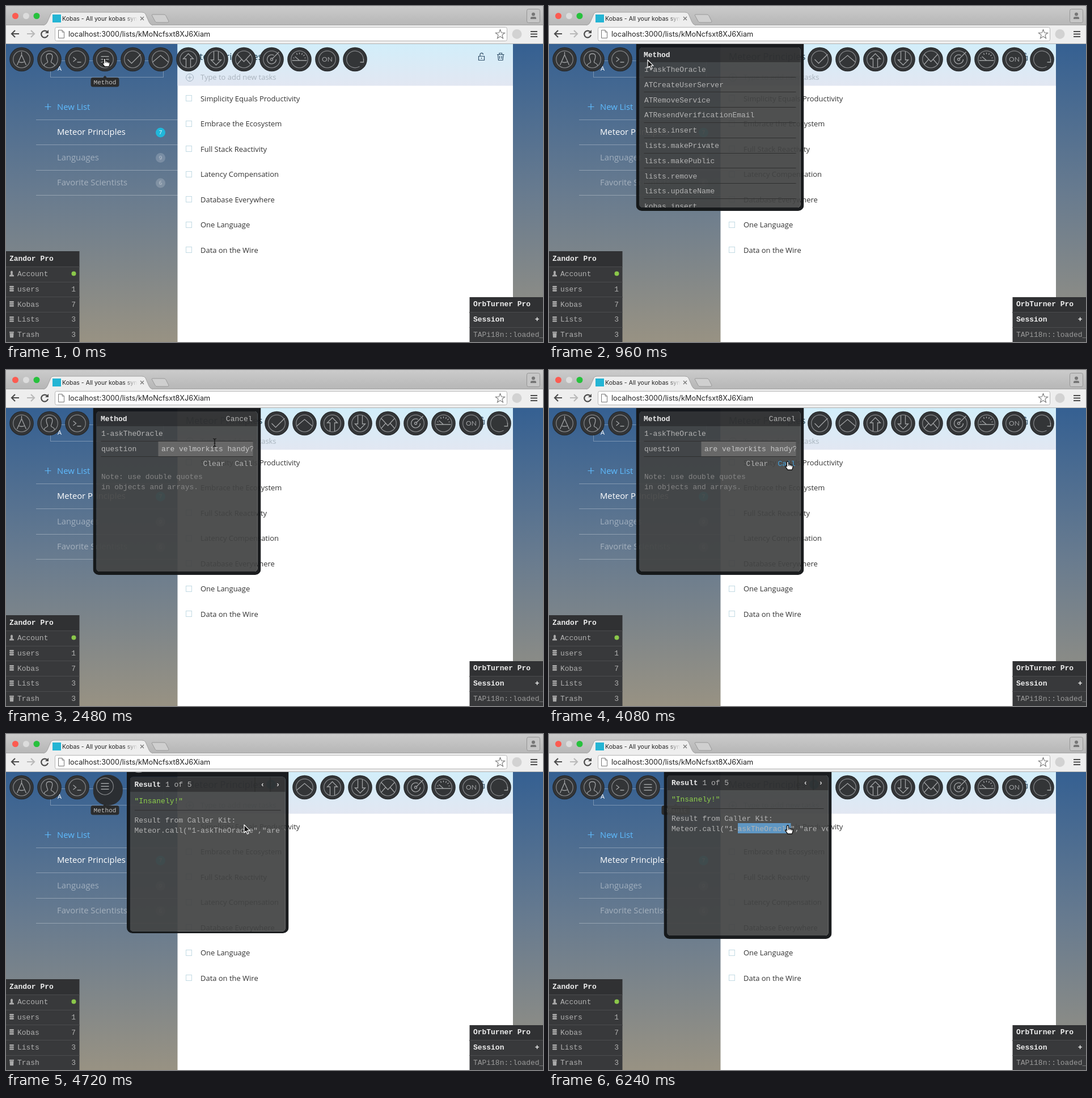
An HTML page with a canvas for the animation above (6320 ms loop, 947 by 592 pixels).

```html
<!DOCTYPE html>
<html lang="en">
<head>
<meta charset="utf-8">
<title>Method panel demo</title>
<style>
html, body { margin: 0; width: 100%; height: 100%; overflow: hidden; background: #fff }
canvas { display: block }
</style>
</head>
<body>
<canvas id="stage" width="947" height="592"></canvas>
<script>
const g = document.getElementById('stage').getContext('2d');
const LOOP = 6320, STEP = 80, TAU = Math.PI * 2;
const OPEN = 325, FORM = 1280, TYPE = 1760, CALL = 4285, HOVER = 5600, SELECT = 5900;
const QUESTION = 'are velmorkits handy?';
const METHODS = ['1-askTheOracle', 'ATCreateUserServer', 'ATRemoveService', 'ATResendVerificationEmail',
  'lists.insert', 'lists.makePrivate', 'lists.makePublic', 'lists.remove', 'lists.updateName', 'kobas.insert'];
const TASKS = ['Simplicity Equals Productivity', 'Embrace the Ecosystem', 'Full Stack Reactivity',
  'Latency Compensation', 'Database Everywhere', 'One Language', 'Data on the Wire'];
const ICONS = [
  'M0-13V-8L-8 10M0-8L8 10M-6 4Q0 7 6 4',
  'M-9 11Q-9 8-4 6Q-2 5-4 1Q-8-10 0-10Q8-10 4 1Q2 5 4 6Q9 8 9 11',
  'M-7-4L-2 0L-7 4M0 5H7',
  'M-7-5H7M-7 0H7M-7 5H7',
  'M-9 0L-2 7L14-9',
  'M-14 5L0-7L14 5',
  'M-4 14V-1H-9L0-10L9-1H4V14',
  'M-4-14V1H-9L0 10L9 1H4V-14',
  'M-12-9L0 4L12-9M-12 9L-4 0M12 9L4 0',
  'M8 0A8 8 0 1 1 4-7M2 0A2 2 0 1 1-2 0A2 2 0 1 1 2 0M1-1L13-13',
  'M-13 2H13M0 2L-8-5M-11-3L-9-2M-5-11L-4-8M0-12V-9M5-11L4-8M9-8L7-6M11-3L9-2',
  '',
  'M15-1V5H9'
].map(d => new Path2D(d));
const ARROW = new Path2D('M0 0V14L3.3 11L5.6 16.2L8 15.2L5.7 10.2H10Z');
const HAND = new Path2D('M-1.5 1Q0-1 1.5 1V5Q3 4 4 6Q6 5 6.5 7Q9 6 9 8.5V11L7.5 15H0L-4.5 9Q-4.5 7-1.5 9Z');
const IBEAM = new Path2D('M-3-7Q0-7 0-5Q0-7 3-7M0-5V5M-3 7Q0 7 0 5Q0 7 3 7M-1.5 1H1.5');

// time, x, y of the pointer tip
const POINTER = [[0, 174, 92], [320, 174, 92], [560, 173, 90], [960, 174, 95], [1180, 190, 107],
  [1320, 190, 107], [1680, 368, 128], [2720, 368, 128], [3520, 421, 161], [4290, 421, 161],
  [4400, 420, 160], [5500, 420, 160], [5600, 421, 161]];

const clamp = v => Math.max(0, Math.min(1, v));
const swing = v => .5 - Math.cos(Math.PI * clamp(v)) / 2;
const mix = (a, b, k) => a + (b - a) * k;

function rect(x, y, w, h, color) { g.fillStyle = color; g.fillRect(x, y, w, h); }
function box(x, y, w, h, r, fill, line) {
  g.beginPath(); g.roundRect(x, y, w, h, r); g.fillStyle = fill; g.fill();
  if (line) { g.strokeStyle = line; g.lineWidth = 1; g.stroke(); }
}
function frame(x, y, w, h, color) { g.lineWidth = 1; g.strokeStyle = color; g.strokeRect(x + .5, y + .5, w, h); }
function disc(x, y, r, color) { g.beginPath(); g.arc(x, y, r, 0, TAU); g.fillStyle = color; g.fill(); }
function shape(d, color, fill, width = 1) {
  const p = d instanceof Path2D ? d : new Path2D(d);
  if (fill) { g.fillStyle = fill; g.fill(p); }
  if (color) { g.strokeStyle = color; g.lineWidth = width; g.stroke(p); }
}
function shade(y0, y1, ...colors) {
  const s = g.createLinearGradient(0, y0, 0, y1);
  colors.forEach((c, i) => s.addColorStop(i / (colors.length - 1), c));
  return s;
}
// y is the middle of the capital letters
function label(s, x, y, size, color, family, align = 'left', weight = 400) {
  g.font = `${weight} ${size}px ${family}`;
  g.textAlign = align;
  g.fillStyle = color;
  g.fillText(s, x, Math.round(y + size * .34));
}
const sans = (s, x, y, size, color, align) => label(s, x, y, size, color, '"Open Sans", sans-serif', align);
const ui = (s, x, y, size, color) => label(s, x, y, size, color, 'Inter, sans-serif');
const mono = (s, x, y, color, align, weight, size = 12.96) =>
  label(s, x, y, size, color, '"Liberation Mono", monospace', align, weight);

function chrome() {
  const bar = '#eeeeee';
  rect(0, 0, 947, 34, shade(0, 34, '#cbcbcb', '#b6b6b6'));
  [['#fc5b51', 16.5], ['#dcdcdc', 35.5], ['#27c13d', 54]].forEach(([c, x]) => disc(x, 17.5, 5.5, c));
  shape('M257 16Q257 15 259 15H278Q281 15 282 17L287 27Q287 29 285 29H267Q264 29 263 27Z', '#999', '#cfcfcf');
  rect(0, 33, 947, 34, bar);
  rect(0, 33, 947, 1, '#a2a2a2');
  shape('M66 34Q71 33 73 28L79 14Q80 11 84 11H240Q244 11 246 14L252 28Q254 33 259 34', '#a2a2a2', bar);
  rect(82, 15, 15, 14, '#24b5d4');
  ui('Kobas - All your kobas sync', 99, 22, 10.5, '#222');
  const fade = g.createLinearGradient(208, 0, 232, 0);
  fade.addColorStop(0, bar + '00');
  fade.addColorStop(1, bar);
  rect(208, 14, 24, 17, fade);
  rect(231, 14, 12, 17, bar);
  shape('M237 19L243 25M243 19L237 25', '#777', null, 1.3);
  box(918.5, 5.5, 23, 24, 3, '#c6c6c6', '#959595');
  disc(930, 14.5, 3, '#777');
  shape('M925 23V21Q925 19 928 19H932Q935 19 935 21V23Z', null, '#777');

  shape('M23 49H10M16 43L10 49L16 55', '#4c4c4c', null, 2.2);
  shape('M37 49H50M44 43L50 49L44 55', '#b9b9b9', null, 2.2);
  shape('M73 46A6 6 0 1 0 74 51', '#4c4c4c', null, 2.2);
  shape('M75 42V48H69Z', null, '#4c4c4c');
  box(86.5, 37.5, 797, 24, 3, '#fff', '#b4b4b4');
  shape('M92.5 42.5H99L102.5 46V56.5H92.5ZM99 42.5V46H102.5', '#777', '#fff');
  ui('localhost:3000/lists/kMoNcfsxt8XJ6Xiam', 110, 49.5, 12.75, '#222');
  g.beginPath();
  for (let i = 0; i < 10; i++) {
    const a = i * TAU / 10 - TAU / 4, r = i % 2 ? 3.6 : 8.5;
    g.lineTo(871.5 + r * Math.cos(a), 50 + r * Math.sin(a));
  }
  g.closePath(); g.strokeStyle = '#777'; g.lineWidth = 1.1; g.stroke();
  disc(901, 49.5, 8.5, '#d2d2d2');
  shape('M925 45H937M925 49.5H937M925 54H937', '#4c4c4c', null, 2.2);
  rect(0, 66, 947, 1, '#b0b0b0');
}

function badge(n, y, active) {
  disc(272.5, y, 8.5, active ? '#21b7da' : 'rgba(255,255,255,.18)');
  sans(n, 272.5, y, 9.5, active ? '#fff' : 'rgba(255,255,255,.55)', 'center');
}

function page() {
  rect(0, 67, 947, 525, shade(67, 592, '#356092', '#687b8f', '#989283'));
  const faint = 'rgba(255,255,255,.3)', dim = 'rgba(255,255,255,.42)';
  frame(78, 96, 199, 29, faint);
  sans('A', 91, 110.5, 11, '#fff');
  shape('M68.5 177.5H79.5M74 172V183', '#5fbcff', null, 1.2);
  sans('New List', 90, 178, 14.8, '#5fbcff');
  sans('Meteor Principles', 90, 222, 14.8, '#fff');
  sans('Languages', 90, 267, 14.8, dim);
  sans('Favorite Scientists', 90, 311, 14.8, dim);
  for (let i = 0; i < 4; i++) rect(53, Math.round(200 + 44.4 * i), 250, 1, faint);
  badge('7', 223, true);
  badge('9', 267.5);
  badge('6', 312);

  rect(302.5, 67, 591.5, 525, '#fff');
  rect(302.5, 67, 591.5, 73.5, shade(67, 140, '#d2eefa', '#e2e7f2'));
  sans('Meteor Principles', 317, 89.5, 16.6, '#1c3f53');
  disc(467.5, 89, 8.5, '#21b7da');
  sans('7', 467.5, 89, 9.5, '#fff', 'center');
  shape('M833.5 88.5H843.5V95.5H833.5ZM836 88V85.5A2.7 2.7 0 0 1 841.4 85.5M838.5 91V93', '#31506a', null, 1.2);
  shape('M866 85.5H878.5M870 85V83H874.5V85M867.5 86L868.5 95.5H876L877 86M870.5 88V93M874 88V93', '#31506a', null, 1.2);
  shape('M330.5 126A6.5 6.5 0 1 1 317.5 126A6.5 6.5 0 1 1 330.5 126M320.5 126H327.5M324 122.5V129.5', '#9fb0bd');
  sans('Type to add new tasks', 343, 126, 12.96, '#a9b4be');
  TASKS.forEach((s, i) => {
    const y = 163.4 + 44.45 * i;
    frame(317, Math.round(y - 6), 10, 10, '#c3dbe4');
    sans(s, 343, y, 12.96, '#333');
  });
}

function dock(x, y, w, rows) {
  for (let i = 0; i < rows; i++) {
    const top = Math.round(y + 26.8 * i);
    rect(x, top, w, 28, i ? '#38393b' : '#303133');
    if (i) rect(x, top, w, 1, '#4b4c4e');
  }
}
function docks() {
  dock(0, 432, 129.5, 6);
  mono('Zandor Pro', 6, 444.5, '#eee', 'left', 700);
  [['Account'], ['users', 1], ['Kobas', 7], ['Lists', 3], ['Trash', 3]].forEach(([name, n], i) => {
    const y = 471.5 + 26.8 * i;
    mono(name, 20, y, '#b0b0b0');
    if (n) mono(n, 123, y, '#b0b0b0', 'right');
    g.save();
    g.translate(10, y);
    if (!i) shape('M-4 5V3L-1.5 1.5Q-3-5 0-5Q3-5 1.5 1.5L4 3V5Z', null, '#aaa');
    else if (i < 4) for (const d of [-4, -.5, 3]) box(-4, d - 1, 8, 2.6, 1.3, '#aaa');
    else shape('M-4-5H4V-3H-4ZM-3.5-2.5H3.5L3 5.5H-3Z', null, '#aaa');
    g.restore();
  });
  disc(119.5, 471.5, 4, '#8bc84a');
  dock(817.5, 512.5, 130, 3);
  mono('OrbTurner Pro', 824, 525, '#eee', 'left', 700);
  mono('Session', 824, 552, '#eee', 'left', 700);
  mono('+', 940.5, 552, '#eee', 'right', 700);
  mono('TAPi18n::loaded_', 824, 579, '#9a9a9a');
}

function tip(s, x) {
  shape(`M${x - 4} 127L${x} 122.5L${x + 4} 127Z`, null, '#2b2c2d');
  box(x - 25, 126, 50, 16.5, 4, '#2b2c2d');
  mono(s, x, 134, '#c4c4c4', 'center', 400, 11.1);
}

function icon(i, x, y) {
  g.save();
  g.translate(x, y);
  g.beginPath();
  g.arc(0, 0, 14.8, i === 12 ? 1 : 0, TAU);
  g.strokeStyle = '#85878a'; g.lineWidth = 1.2; g.stroke();
  shape(ICONS[i], '#a0a2a4', null, 1.3);
  if (i === 11) label('ON', 0, 0, 12, '#a0a2a4', 'Lato, sans-serif', 'center');
  g.restore();
}

const rule = (y, w) => rect(14, y, w - 28, 1, '#2f2f2f');

function methodContent(t, w) {
  mono('Method', 13.5, 85.5, '#eee', 'left', 700);
  if (t < FORM) {
    METHODS.forEach((s, i) => {
      const hot = !i && t >= 1120;
      mono(s, 14.5, 111.5 + 26.8 * i, hot ? '#55aee8' : '#b4b4b4');
      rule(Math.round(124.5 + 26.8 * i), w);
    });
    return;
  }
  mono('Cancel', w - 15, 85.5, '#b4b4b4', 'right');
  mono(METHODS[0], 14.5, 111.5, '#b4b4b4');
  rule(125, w);
  mono('question', 14.5, 138.5, '#b4b4b4');
  rule(152, w);
  rect(115, 126, w - 129, 26, '#686868');
  g.save();
  g.beginPath(); g.rect(115, 126, w - 129, 26); g.clip();
  mono(QUESTION.slice(0, clamp((t - TYPE) / 620) * QUESTION.length), 120.5, 138.5, '#c8c8c8');
  g.restore();
  mono('Clear', 194, 165, '#b4b4b4');
  mono('Call', 250, 165, t >= 3440 ? '#48a5e0' : '#b4b4b4');
  mono('Note: use double quotes', 14.5, 187.5, '#858585');
  mono('in objects and arrays.', 14.5, 206, '#858585');
}

function resultContent(t, w) {
  mono('Result', 13.5, 85.5, '#eee', 'left', 700);
  mono('1 of 5', 68, 85.5, '#b4b4b4');
  rect(w - 60, 73, 1, 26, '#2b2b2b');
  rect(w - 33, 73, 1, 26, '#2b2b2b');
  mono('‹', w - 46, 85.5, '#ddd', 'center', 700);
  mono('›', w - 19, 85.5, '#ddd', 'center', 700);
  mono('"Insanely!"', 13.5, 114.5, '#8fd14c');
  rule(131, w);
  mono('Result from Caller Kit:', 13.5, 148.5, '#b4b4b4');
  if (t >= SELECT) rect(130.5, 157, 93.5, 18, '#5f97c4');
  mono(`Meteor.call("1-askTheOracle","${QUESTION}")`, 13.5, 167, '#b4b4b4');
}

// A toolbar button that grows into a panel as p goes from 0 to 1.
function cell(i, x, p, t) {
  if (!p) {
    disc(x + 21, 94, 21.3, '#232527');
    disc(x + 21, 94, 20.3, '#333537');
    return icon(i, x + 21, 94);
  }
  const w = 42 + 254 * p, top = mix(73, 40, p), bottom = mix(116, 361, p);
  const dy = 69 * (1 - p), k = clamp(p * 4);
  const r = Math.min(w / 2, 10 + 22 * (1 - p) ** 4);
  const inH = 282 - 245 * (1 - p);
  g.save();
  g.beginPath(); g.roundRect(x, top, w, bottom - top, r); g.clip();
  const inner = new Path2D();
  inner.roundRect(x + 6, 73 + dy, Math.max(0, w - 12), inH, 5);
  const border = new Path2D();
  border.rect(x, top, w, bottom - top);
  border.addPath(inner);
  g.fillStyle = `rgba(${mix(48, 20, k)},${mix(50, 22, k)},${mix(52, 24, k)},.97)`;
  g.fill(border, 'evenodd');
  icon(i, x + 21, 94 - 43 * p);
  g.fillStyle = 'rgba(66,67,67,.93)';
  g.fill(inner);
  g.clip(inner);
  g.translate(x, dy);
  rect(6, 73, w, 26, 'rgba(30,31,32,.5)');
  (i === 3 ? methodContent : resultContent)(t, w);
  g.restore();
}

function toolbar(t) {
  const result = swing((t - CALL) / 500);
  const method = swing((t - OPEN) / 500) - result;
  if (t < OPEN || (t >= CALL && method > 0)) tip('Method', 174.5);
  if (t >= HOVER) tip('Result', 223.5);
  let x = 6.5;
  for (let i = 0; i < 13; i++) {
    const p = i === 3 ? method : i === 4 ? result : 0;
    cell(i, x, p, t);
    x += 49 + 254 * p;
  }
}

function pointer(t) {
  const n = POINTER.findIndex(k => k[0] > t);
  const b = POINTER[n < 0 ? POINTER.length - 1 : n], a = n < 0 ? b : POINTER[n - 1];
  const k = a === b ? 0 : swing((t - a[0]) / (b[0] - a[0]));
  const hand = t < OPEN || (t >= 1120 && t < 1400) || (t >= 3440 && t < CALL) || t >= HOVER;
  const beam = t >= 1600 && t < 2880;
  g.save();
  g.translate(mix(a[1], b[1], k), mix(a[2], b[2], k));
  g.lineJoin = 'round';
  if (beam) shape(IBEAM, '#111', null, 1.2);
  else if (hand) {
    shape(HAND, '#111', '#fff', 1.3);
    shape('M1.5 5V8M4 6V8.5M6.5 7V9', '#111');
  } else shape(ARROW, '#fff', '#111', 1.2);
  g.restore();
}

function draw() {
  const t = Math.floor(performance.now() % LOOP / STEP) * STEP;
  page();
  docks();
  toolbar(t);
  chrome();
  pointer(t);
  requestAnimationFrame(draw);
}
draw();
</script>
</body>
</html>
```
